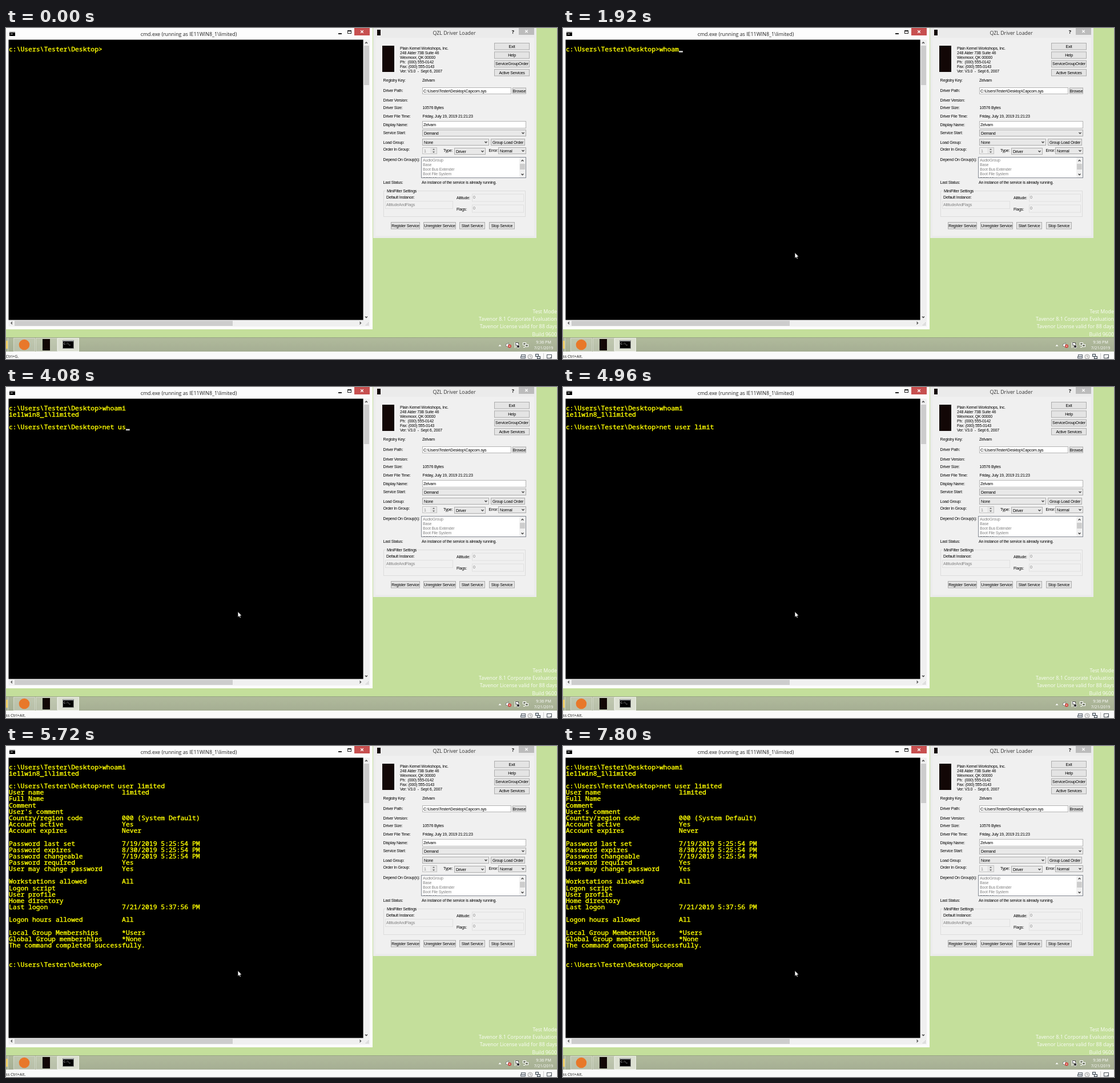
Animation of 965 by 580 pixels, one loop 8000 ms. Source, as an HTML page with a canvas:

```html
<!DOCTYPE html>
<html lang="en">
<head>
<meta charset="utf-8">
<title>Terminal session</title>
<style>
html, body { margin: 0; width: 100%; height: 100%; overflow: hidden; background: #c4df9b; }
canvas { display: block; }
</style>
</head>
<body>
<canvas id="stage" width="965" height="580"></canvas>
<script>
const ctx = document.getElementById('stage').getContext('2d');
const LOOP = 8000;
const UI = '8.85px "Open Sans", sans-serif';
const TINY = '7.1px "Open Sans", sans-serif';
const FORM = '7.1px "Liberation Sans", Arial, sans-serif';
const MONO = '11.38px "Noto Sans Mono", monospace';
const CELL = 6.83, ROW = 11.16;

function rect(x, y, w, h, fill, line) {
  if (fill) { ctx.fillStyle = fill; ctx.fillRect(x, y, w, h); }
  if (line) {
    ctx.strokeStyle = line;
    ctx.lineWidth = 1;
    ctx.strokeRect(x + .5, y + .5, w - 1, h - 1);
  }
}

function text(s, x, y, font, color = '#000', align = 'left', gap = 0) {
  ctx.font = font;
  ctx.fillStyle = color;
  ctx.textAlign = align;
  ctx.letterSpacing = gap + 'px';
  ctx.fillText(s, x, y);
}

function path(points, color, width = 1, fill) {
  ctx.beginPath();
  points.forEach(([x, y], i) => i ? ctx.lineTo(x, y) : ctx.moveTo(x, y));
  if (fill) { ctx.closePath(); ctx.fillStyle = fill; ctx.fill(); }
  if (color) { ctx.strokeStyle = color; ctx.lineWidth = width; ctx.stroke(); }
}

function disc(x, y, r, fill, line) {
  ctx.beginPath();
  ctx.arc(x, y, r, 0, Math.PI * 2);
  if (fill) { ctx.fillStyle = fill; ctx.fill(); }
  if (line) { ctx.strokeStyle = line; ctx.lineWidth = 1; ctx.stroke(); }
}

function cross(x, y, r, color, width = 1.3) {
  path([[x - r, y - r], [x + r, y + r]], color, width);
  path([[x + r, y - r], [x - r, y + r]], color, width);
}

function chevron(x, y, dx, dy, color = '#444') {
  const r = 2;
  const ends = dx ? [[x - dx, y - r], [x + dx, y], [x - dx, y + r]]
                  : [[x - r, y - dy], [x, y + dy], [x + r, y - dy]];
  path(ends, color, 1.3);
}

// Form helpers take the vertical middle of the text line.
const label = (s, x, mid, color, align) => text(s, x, mid + 2.6, FORM, color, align, -.22);

function button(s, x, y, w, h = 12.5) {
  rect(x, y, w, h, '#e4e4e4', '#adadad');
  label(s, x + w / 2, y + h / 2, '#000', 'center');
}

function field(s, x, y, w, h = 12) {
  rect(x, y, w, h, '#fff', '#b4b4b4');
  label(s, x + 2, y + h / 2);
}

function combo(s, x, y, w) {
  rect(x, y, w, 12, '#e8e8e8', '#adadad');
  label(s, x + 3, y + 6.3);
  chevron(x + w - 5.5, y + 6, 0, 1);
}

function dimField(s, x, y, w) {
  rect(x, y, w, 14, '#f0f0f0', '#e0e0e0');
  label(s, x + 2, y + 6, '#838383');
}

function drawDialog() {
  rect(643, 0, 286, 368, '#ebebeb');
  rect(647, 17, 278, 347, '#f0f0f0');
  rect(650, 3, 6, 10, '#120706');
  text('QZL Driver Loader', 785, 12, UI, '#333', 'center');
  text('?', 888, 9.5, 'bold 9px "Open Sans", sans-serif', '#111', 'center');
  rect(898, 0, 27, 12, '#bcbcbc');
  cross(911.5, 5.8, 2.2, '#fff');

  rect(659, 31, 21, 46, '#120706');
  ['Plain Kernel Workshops, Inc.', '248 Alder 73B Suite 46', 'Wexmoor, QK 00000',
   'Ph:  (000) 555-0142', 'Fax: (000) 555-0143', 'Ver: V3.0  -  Sept 6, 2007']
    .forEach((s, i) => label(s, 690, 35.4 + i * 8.05));
  ['Exit', 'Help', 'ServiceGroupOrder', 'Active Services']
    .forEach((s, i) => button(s, 855, 26 + i * 15.3, 62));

  [['Registry Key:', 91], ['Driver Path:', 109.7], ['Driver Version:', 126], ['Driver Size:', 139.5],
   ['Driver File Time:', 154.3], ['Display Name:', 169], ['Service Start:', 183.6],
   ['Load Group:', 200.7], ['Order In Group:', 212.7], ['Depend On Group(s):', 230],
   ['Last Status:', 270.5]].forEach(([s, y]) => label(s, 660.5, y));
  label('Zelvam', 729, 91);
  field('C:\\Users\\Tester\\Desktop\\Capcom.sys', 729, 104, 156);
  button('Browse', 887, 104.5, 24, 11);
  label('10576 Bytes', 729.5, 139.5);
  label('Friday, July 19, 2019 21:21:23', 729.5, 154.3);
  field('Zelvam', 729, 163, 182, 13);
  combo('Demand', 729, 178, 182);
  combo('None', 729, 194, 117);
  button('Group Load Order', 849, 194, 60, 12);

  rect(729, 209, 26, 12, '#f0f0f0', '#c4c4c4');
  label('1', 732, 215, '#838383');
  rect(743, 210, 11, 10, '#e6e6e6');
  path([[747, 213.6], [749, 211.4], [751, 213.6]], null, 0, '#555');
  path([[747, 216.6], [749, 218.8], [751, 216.6]], null, 0, '#555');
  label('Type:', 766, 214);
  combo('Driver', 785, 210, 55);
  label('Error:', 845.5, 214);
  combo('Normal', 862, 209, 49);

  rect(727, 226, 184, 37, '#fff', '#828790');
  ctx.save();
  ctx.beginPath();
  ctx.rect(728, 227, 170, 35);
  ctx.clip();
  ['AudioGroup', 'Base', 'Boot Bus Extender', 'Boot File System', 'SCSI Miniport']
    .forEach((s, i) => label(s, 730, 231.7 + i * 8, '#838383'));
  ctx.restore();
  rect(899, 227, 11, 35, '#f0f0f0');
  rect(900, 238, 9, 10, '#cdcdcd');
  chevron(904.5, 232.5, 0, -1);
  chevron(904.5, 256.5, 0, 1);
  label('An instance of the service is already running.', 728, 270.5);

  rect(661, 285, 249, 46, null, '#dcdcdc');
  rect(665, 281, 55, 8, '#f0f0f0');
  label('MiniFilter Settings', 667, 285);
  label('Default Instance:', 666, 296.5);
  dimField('AltitudeAndFlags', 664, 303, 119);
  label('Altitude:', 789, 297.5);
  dimField('0', 816, 290.5, 91);
  label('Flags:', 789, 317);
  dimField('0', 816, 309.5, 91);
  [['Register Service', 674, 51], ['Unregister Service', 731, 57],
   ['Start Service', 794, 45], ['Stop Service', 846, 45]]
    .forEach(([s, x, w]) => button(s, x, 340, w));
}

function drawConsole(title) {
  rect(0, 0, 642, 528, '#fcfcfc');
  rect(6, 6, 10, 8, '#000');
  rect(6, 6, 10, 2, '#bbb');
  rect(8, 10, 4, 1, '#ddd');
  text(title, 320, 13.5, UI, '#222', 'center');
  rect(582, 9, 6, 2, '#222');
  rect(598, 4, 7, 6, null, '#222');
  rect(598, 4, 7, 2, '#222');
  rect(610, 0, 27, 13, '#c75050');
  cross(623.5, 6.5, 2.3, '#fff');

  rect(625.6, 20.5, 11.4, 502.5, '#f0f0f0');
  rect(4.5, 511.6, 632.5, 11.4, '#f0f0f0');
  rect(4.5, 20.5, 621.1, 491.1, '#000');
  rect(627, 31, 9, 69, '#cdcdcd');
  rect(15, 513, 382, 9, '#cdcdcd');
  chevron(631, 26, 0, -1);
  chevron(631, 506.5, 0, 1);
  chevron(10, 517, -1, 0);
  chevron(620.5, 517, 1, 0);
  for (let i = 0; i < 3; i++)
    for (let j = 0; j <= i; j++) rect(634 - j * 2, 516 + i * 2, 1, 1, '#aaa');
}

function drawDesktop() {
  rect(0, 0, 965, 580, '#c4df9b');
  ['Test Mode', 'Tavenor 8.1 Corporate Evaluation', 'Tavenor License valid for 88 days', 'Build 9600']
    .forEach((s, i) => text(s, 965, 499.5 + i * 13.4, UI, 'rgba(255,255,255,.92)', 'right'));
}

function drawTaskbar(status) {
  const bar = ctx.createLinearGradient(0, 542, 0, 567);
  bar.addColorStop(0, '#b1bb9c');
  bar.addColorStop(1, '#a5ae93');
  rect(0, 542, 965, 25, bar);
  rect(0, 542, 965, 1, '#97a383');
  rect(0, 548, 4, 14, '#f0cf67');
  rect(3, 543, 1, 24, '#d0d6c2');
  [13, 52].forEach(x => rect(x, 543, 38, 24, 'rgba(255,255,255,.2)', 'rgba(255,255,255,.35)'));
  rect(90, 543, 38, 24, '#dce0d2', '#edf0e7');
  disc(32, 555, 9.3, '#e8782a');
  rect(64, 545, 13, 20, '#120706');
  rect(99, 547, 20, 15, '#000', '#8a8d8a');
  rect(100, 548, 18, 1, '#c9cdd0');
  text('C:\\_', 101, 555, '5px "Noto Sans Mono", monospace', '#fff');

  path([[862.5, 557.5], [865, 554.8], [867.5, 557.5]], null, 0, '#fff');
  path([[875.5, 554], [877.5, 554], [880, 551.5], [880, 560], [877.5, 557.5], [875.5, 557.5]], '#555', .6, '#fff');
  disc(882, 557.5, 3, '#cf3b32');
  cross(882, 557.5, 1.2, '#fff', .9);
  path([[891.5, 551], [891.5, 560.5]], '#fff', 1.2);
  rect(892, 551, 6, 5, '#fff', '#555');
  disc(897, 558, 2.8, '#333', '#eee');
  rect(905, 551, 6, 5, '#7c8371', '#fff');
  rect(909, 554, 6, 5, '#7c8371', '#fff');
  path([[906, 559.5], [909, 559.5]], '#fff');
  text('9:36 PM', 941.5, 552.5, TINY, '#fff', 'center');
  text('7/21/2019', 941.5, 563, TINY, '#fff', 'center');

  rect(0, 567, 965, 13, '#fafafa');
  text(status, -.5, 578, TINY, '#222');
  rect(902, 572, 8, 4, '#e5e8eb', '#59616b');
  rect(901, 575, 9, 4, '#d2d7dc', '#59616b');
  disc(918, 576, 4, '#eee', '#a2a2a2');
  path([[918, 573.5], [918, 576], [920, 577]], '#a2a2a2');
  rect(927, 571, 6, 5, '#dce4ea', '#3b434b');
  rect(930, 575, 6, 5, '#dce4ea', '#3b434b');
  rect(941, 570, 1, 10, '#ccc');
  rect(947, 572, 9, 7, '#fff', '#4c545c');
  path([[952, 579], [955.5, 575.5]], '#4c545c');
}

const PROMPT = 'c:\\Users\\Tester\\Desktop>';
const TITLE = 'cmd.exe (running as IE11WIN8_1\\limited)';
const commands = [
  { row: 0, start: 0, text: 'whoami', keys: [1120, 1280, 1680, 1840, 1920, 2160] },
  { row: 3, start: 2280, text: 'net user limited', keys: [3400, 3520, 3760, 3840, 3920, 4080, 4240, 4240,
    4400, 4560, 4640, 4720, 4840, 4920, 5080, 5240] },
  { row: 31, start: 5720, text: 'capcom', keys: [6800, 6960, 7200, 7440, 7560, 7800] }
];
const report = [
  'User name|limited', 'Full Name', 'Comment', "User's comment",
  'Country/region code|000 (System Default)', 'Account active|Yes', 'Account expires|Never', '',
  'Password last set|7/19/2019 5:25:54 PM', 'Password expires|8/30/2019 5:25:54 PM',
  'Password changeable|7/19/2019 5:25:54 PM', 'Password required|Yes', 'User may change password|Yes', '',
  'Workstations allowed|All', 'Logon script', 'User profile', 'Home directory',
  'Last logon|7/21/2019 5:37:56 PM', '', 'Logon hours allowed|All', '',
  'Local Group Memberships|*Users', 'Global Group memberships|*None', 'The command completed successfully.'
];
const caretOn = [[400, 920], [1440, 1680], [1920, 2160], [3080, 3400], [3520, 3760], [4080, 4240],
  [4640, 4960], [5640, 5720], [6720, 6800], [7280, 7440]];
const diskOn = [[2760, 2840], [3840, 3920], [4640, 4720], [6240, 6320]];
const within = (spans, t) => spans.some(([a, b]) => t >= a && t < b);

// A hairline outline gives the console face its weight.
function print(s, row, col = 0) {
  const x = 5 + col * CELL, y = 40.6 + row * ROW;
  text(s, x, y, MONO, '#ff0');
  ctx.strokeStyle = '#ff0';
  ctx.lineWidth = .4;
  ctx.strokeText(s, x, y);
}

function drawSession(t) {
  let row = 0, col = 0;
  for (const cmd of commands) {
    if (t < cmd.start) break;
    const typed = cmd.keys.filter(k => k <= t).length;
    print(PROMPT + cmd.text.slice(0, typed), cmd.row);
    row = cmd.row;
    col = PROMPT.length + typed;
  }
  if (t >= 2280) print('ie11win8_1\\limited', 1);
  if (t >= 5720) report.forEach((line, i) => {
    const [name, value] = line.split('|');
    print(name, 4 + i);
    if (value) print(value, 4 + i, 29);
  });
  if (t >= 5560 && t < 5720) { row = 4; col = 0; }
  if (within(caretOn, t)) rect(5 + col * CELL, 40.1 + row * ROW, CELL, 2.6, '#d0d0d0');
}

function drawPointer(t) {
  if (t < 80) return;
  const p = Math.min(1, (Math.floor((t - 80) / 72) + 1) / 6);
  const left = (1 - p) ** 2;
  const x = 406 + 180 * left, y = 393.5 + 166 * left;
  const shape = [[0, 0], [0, 10], [2.3, 8], [3.8, 11.5], [5.4, 10.8], [4, 7.5], [7, 7.2]];
  path([...shape, [0, 0]].map(([a, b]) => [x + a, y + b]), '#000', .8, '#fff');
}

function draw(t) {
  drawDesktop();
  drawDialog();
  drawConsole(TITLE + (t >= 5560 && t < 5720 ? ' - net  user limited' : ''));
  drawSession(t);
  drawTaskbar(t < 160 ? 'Ctrl+G.' : 'ss Ctrl+Alt.');
  if (within(diskOn, t)) rect(907, 577, 3, 3, '#54b948');
  if (t >= 4800 && t < 4880) rect(933, 577, 3, 3, '#54b948');
  drawPointer(t);
}

const begin = performance.now();
function tick() {
  draw((performance.now() - begin) % LOOP);
  requestAnimationFrame(tick);
}
tick();
</script>
</body>
</html>
```
